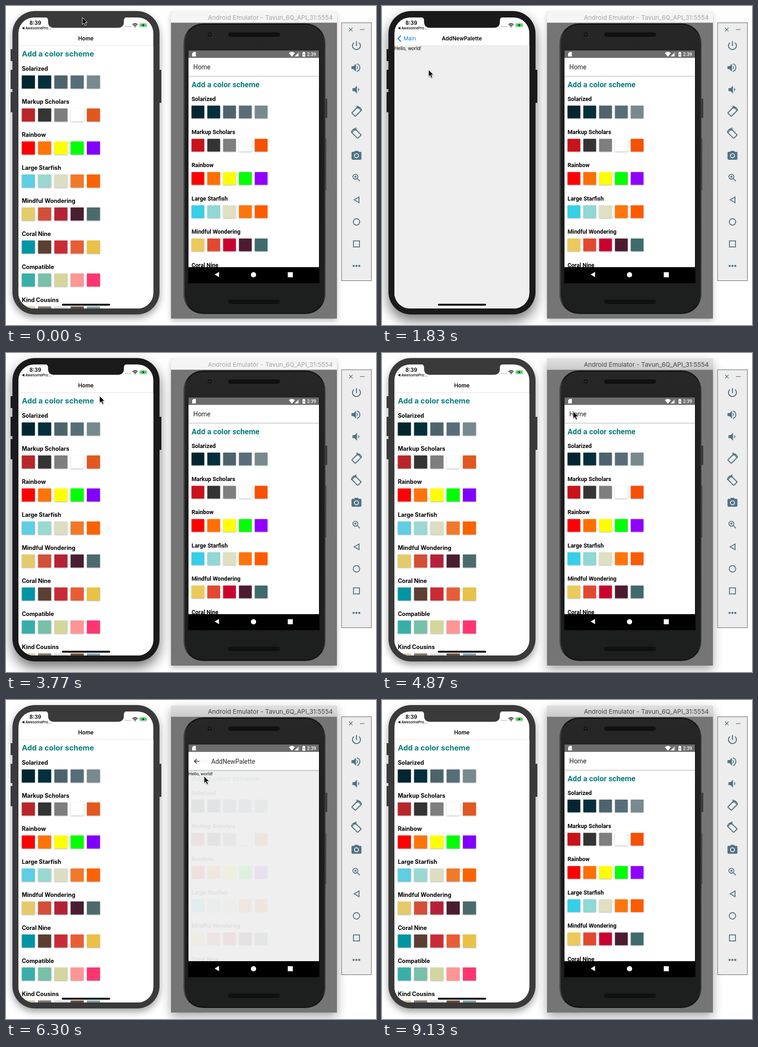
Recreate the animation shown at these times as an HTML page. Size 805 by 695 pixels, loop 9160 ms.

```html
<!DOCTYPE html>
<html lang="en">
<head>
<meta charset="utf-8">
<title>Color schemes on two phones</title>
<style>
html, body { margin: 0; width: 100%; height: 100%; overflow: hidden; background: #fff; }
svg { display: block; width: 805px; height: 695px; }
.ios { font-family: Inter, sans-serif; }
.droid { font-family: Roboto, sans-serif; }
.bold { font-weight: 700; }
.semi { font-weight: 600; }
.swatch { filter: drop-shadow(0 1px 1px rgba(0, 0, 0, .32)); }
</style>
</head>
<body>
<svg viewBox="0 0 805 695">
  <defs>
    <clipPath id="iosScreen"><rect x="27" y="25" width="293.5" height="634" rx="34"/></clipPath>
    <clipPath id="iosBody"><rect x="27" y="86.5" width="294" height="573"/></clipPath>
    <clipPath id="droidCard"><rect x="397" y="113" width="284" height="456"/></clipPath>
    <linearGradient id="bar" x2="0" y2="1">
      <stop stop-color="#e0e0e0"/><stop offset="1" stop-color="#cbcbcb"/>
    </linearGradient>
    <linearGradient id="rim" x2="1" y2="0">
      <stop stop-color="#4a4a4a"/><stop offset=".04" stop-color="#151515"/>
      <stop offset=".97" stop-color="#151515"/><stop offset="1" stop-color="#3c3c3c"/>
    </linearGradient>
    <linearGradient id="glass" x2="0" y2="1">
      <stop stop-color="#272727"/><stop offset=".5" stop-color="#1c1c1c"/><stop offset="1" stop-color="#1d1f1e"/>
    </linearGradient>
    <pattern id="mesh" width="3" height="3" patternUnits="userSpaceOnUse">
      <rect width="3" height="3" fill="#0b0b0b"/><circle cx="1.5" cy="1.5" r=".7" fill="#2b2b2b"/>
    </pattern>
  </defs>
  <rect width="805" height="695" fill="#fff"/>

  <!-- emulator window -->
  <g id="droidShadow"><path d="M359 681V17q0-5 5-5H715q5 0 5 5V681z" fill="#757575"/></g>
  <path id="titleBar" d="M359 36V17q0-5 5-5H715q5 0 5 5V36z"/>
  <path d="M359 36.5H720" stroke="#b4b4b4" stroke-width=".8"/>
  <text id="titleText" class="ios" x="711" y="29.6" font-size="13.6" text-anchor="end">Android Emulator - Tavun_6Q_API_31:5554</text>
  <rect x="695" y="202" width="4" height="42" rx="1" fill="#3c3c3c"/>
  <rect x="695" y="289" width="2" height="112" fill="#4a4a4a"/>
  <rect x="386" y="38" width="309" height="633" rx="43" fill="url(#rim)"/>
  <rect x="389" y="41" width="303.5" height="627" rx="40" fill="url(#glass)"/>
  <circle cx="443" cy="62" r="4.5" fill="#111"/><circle cx="443" cy="62" r="2" fill="#30343a"/>
  <rect x="483" y="57.5" width="113" height="9.5" rx="4.7" fill="url(#mesh)"/>
  <rect x="483" y="639.5" width="113" height="9.5" rx="4.7" fill="url(#mesh)"/>
  <rect x="396.5" y="97" width="285.5" height="507" fill="#000"/>
  <rect x="397" y="97" width="284" height="16" fill="#6d6d6d"/>
  <g fill="#fff">
    <path d="M405 103l3-3h5v10h-8z"/>
    <path d="M615.500 102.500q6.500-5 13 0l-6.500 8z"/>
    <path d="M638 100v10h-10z" fill-opacity=".45"/><path d="M635 103v7h-7z"/>
    <path d="M645 101h1.500v-1h3v1h1.500v9.500h-6z"/>
    <text class="droid" x="655" y="108.700" font-size="10" font-weight="500">2:39</text>
    <path d="M454 585l9.500-5.800v11.600z"/><circle cx="538.500" cy="585.500" r="5.700"/><rect x="613" y="580" width="11" height="11"/>
  </g>
  <path d="M648.600 102l-2 4h1.500l-.5 3 2-4h-1.500z" fill="#6d6d6d"/>
  <g class="droid" clip-path="url(#droidCard)">
    <rect x="397" y="113" width="284" height="456" fill="#fff"/>
    <g id="droidList"></g>
    <g class="header"><rect x="397" y="113" width="284" height="39" fill="#fff" class="swatch"/></g>
    <text x="407.500" y="138" font-size="13.850" fill="#1d1d1d">Home</text>
    <g id="droidNew">
      <rect x="397" y="113" width="284" height="500" fill="#efefef"/>
      <rect x="397" y="113" width="284" height="39" fill="#fff" class="swatch"/>
      <circle id="ripple" cx="415" cy="132.500" r="15" fill="#d9d9d9"/>
      <path d="M420.500 132.800H410M415 127.700l-5.200 5.100 5.200 5.100" fill="none" stroke="#1d1d1d" stroke-width="1.400"/>
      <text x="446.500" y="138" font-size="13.850" fill="#1d1d1d">AddNewPalette</text>
      <text x="397" y="163" font-size="9.700">Hello, world!</text>
    </g>
  </g>

  <!-- emulator tool panel -->
  <rect x="730" y="36.500" width="65" height="562" fill="#ededed" stroke="#5b5b5b"/>
  <g id="tools" fill="#507385" stroke="none"></g>

  <!-- iPhone -->
  <g id="iosShadow" class="frame"><rect x="14" y="11" width="320" height="661" rx="49"/></g>
  <g class="frame">
    <path d="M10 94h5v26h-5zM10 139h5v42h-5zM10 187.500h5v44h-5zM333 139h5v72h-5z"/>
  </g>
  <g class="ios" clip-path="url(#iosScreen)">
    <rect x="27" y="25" width="294" height="635" fill="#fff"/>
    <g clip-path="url(#iosBody)">
      <g id="iosList"></g>
      <g id="iosNew">
        <rect x="27" y="86" width="294" height="574" fill="#efefef" style="filter:drop-shadow(0 0 3px rgba(0,0,0,.3))"/>
        <text x="27" y="96" font-size="9.900">Hello, world!</text>
      </g>
    </g>
    <path d="M27 86.500H321" stroke="#d9d9d9" stroke-width=".8"/>
    <text id="iosHome" class="semi" x="173.700" y="75.200" font-size="11.700" text-anchor="middle">Home</text>
    <text id="iosTitle" class="semi" x="173.700" y="75.200" font-size="11.700" text-anchor="middle">AddNewPalette</text>
    <g id="iosBack">
      <path d="M41 64.500l-6.200 6.500 6.200 6.500" fill="none" stroke="#1580d8" stroke-width="2"/>
      <text x="47" y="75.200" font-size="11.700" fill="#1580d8">Main</text>
    </g>
    <text class="semi" x="51" y="40.700" font-size="11.500">8:39</text>
    <path d="M34.500 48.300l5.500-3v6z"/>
    <text x="42" y="51.200" font-size="7.900" font-weight="500">AwesomePro...</text>
    <g fill="#b8b8b8"><circle cx="260" cy="44.500" r="1.200"/><circle cx="263.700" cy="44.500" r="1.200"/><circle cx="267.400" cy="44.500" r="1.200"/><circle cx="271" cy="44.500" r="1.200"/></g>
    <g fill="none" stroke="#000" stroke-width="1.700"><path d="M275.500 40.700q5.300-4.600 10.600 0M277.600 43q3.200-2.700 6.400 0"/></g>
    <path d="M279 44.800q1.800-1.300 3.600 0l-1.800 2z"/>
    <rect x="290.500" y="37.500" width="16" height="8.500" rx="2" fill="#fff" stroke="#999" stroke-width=".8"/>
    <rect x="291.700" y="38.700" width="13.600" height="6.100" rx="1" fill="#37d84d"/>
    <path d="M307.600 40.300q1.500 1.500 0 3z" fill="#999"/>
    <path d="M299.500 38l-3.500 4.300h2.300l-.8 3.200 3.500-4.300h-2.300z"/>
    <rect x="121.500" y="648.800" width="105" height="4" rx="2"/>
  </g>
  <path class="frame" d="M83 24q8.500 0 8.500 8v2q0 13.500 13.500 13.500H243q13.500 0 13.500-13.500v-2q0-8 8.500-8z"/>

  <path id="cursor" d="M0 0V15.300L3.500 12 6.100 17.800 8.700 16.600 6.200 11H11z" fill="#000" stroke="#fff" stroke-width="1" style="filter:drop-shadow(0 1px 1px rgba(0,0,0,.35))"/>
</svg>
<script>
const LOOP = 9160;
const $ = id => document.getElementById(id);

const schemes = [
  ['Solarized', '02252f 042f3c 4d646c 576e79 778a8d'],
  ['Markup Scholars', 'b92629 343434 7e7e7e ffffff e2571f', 'c9121a 343434 7e7e7e ffffff f75002'],
  ['Rainbow', 'ff0000 ff7409 ffff00 00ff00 8000ff', 'ff0000 ff6f00 ffff00 00ff00 9000ff'],
  ['Large Starfish', '5fcde4 9ad8d2 dddcc4 f2792a fb6200', '35cfe8 8fd8d3 dfe0c2 ff740a ff5a00'],
  ['Mindful Wondering', 'e5ca6b d34f38 b52238 4a1e30 4c6a6c', 'ecc95b e2482f c9022f 4d1b2f 3f6b6c'],
  ['Coral Nine', '0095a5 5c3e32 c92c36 e85d36 e9c147'],
  ['Compatible', '39aea9 78c0a8 d5d69d ff9594 ff3571'],
  ['Kind Cousins', 'dcc6aa 86776a dedede 6d4e38 829fae']
];

function listMarkup(o) {
  const text = (s, y, size, fill) =>
    `<text class="bold" x="${o.x}" y="${y}" font-size="${size}" fill="${fill}">${s}</text>`;
  const rows = schemes.map(([name, ios, droid], r) => {
    const y = r * o.rowStep;
    const colors = (o.droid && droid || ios).split(' ');
    return text(name, o.titleY + y, o.size, '#000') + colors.map((c, i) =>
      `<rect class="swatch" x="${o.x + i * o.step}" y="${o.boxY + y}" width="${o.box}" height="${o.box}" fill="#${c}"/>`).join('');
  });
  return text('Add a color scheme', o.headY, o.headSize, '#087d7c') + rows.join('');
}

$('iosList').innerHTML = '<rect x="27" y="86" width="294" height="574" fill="#fff"/>' + listMarkup(
  { x: 34.4, headY: 110, headSize: 16.3, titleY: 141.3, size: 12.45, boxY: 151.3, box: 28.5, step: 35.4, rowStep: 71.9 });
$('droidList').innerHTML = listMarkup(
  { droid: true, x: 403.7, headY: 176.6, headSize: 16.6, titleY: 206.6, size: 12.45, boxY: 217, box: 27.7, step: 34.4, rowStep: 72.4 });

// Tool icons on a 24-unit grid, one every 48px
const stroke = 'fill="none" stroke="#507385" stroke-width="2"';
const rotate = '<g transform="rotate(45 12 12)"><rect x="7" y="3.500" width="10" height="17" rx="1"' + stroke +
  '/></g><path d="M13 1.500q8 .500 9.500 8.500M13 .500l4 3.500-4 1z" fill="none" stroke="#507385" stroke-width="1.600"/>';
const icons = [
  '<path d="M13 3h-2v10h2V3zm4.830 2.170l-1.420 1.420C17.990 7.860 19 9.810 19 12c0 3.870-3.130 7-7 7s-7-3.130-7-7c0-2.190 1.010-4.140 2.580-5.420L6.170 5.170C4.230 6.820 3 9.260 3 12c0 4.970 4.030 9 9 9s9-4.030 9-9c0-2.740-1.230-5.180-3.170-6.830z"/>',
  `<path d="M2 9v6h4l5 5V4L6 9z"/><path d="M13 8q4 4 0 8z"/><path d="M13 4.300a8 8 0 0 1 0 15.400" ${stroke}/>`,
  '<path d="M4 9v6h4l5 5V4L8 9z"/><path d="M15.500 8q4.500 4 0 8z"/>',
  rotate,
  `<g transform="matrix(-1 0 0 1 24 0)">${rotate}</g>`,
  '<path fill-rule="evenodd" d="M9 2L7.200 4H4q-2 0-2 2v12q0 2 2 2h16q2 0 2-2V6q0-2-2-2h-3.200L15 2zM12 7a5 5 0 1 1 0 10 5 5 0 1 1 0-10z"/><circle cx="12" cy="12" r="3.200"/>',
  `<circle cx="9.500" cy="9.500" r="5.700" ${stroke}/><path d="M14 14l6 6M9.500 7v5M7 9.500h5" ${stroke}/>`,
  `<path d="M18 5.500v13L6.500 12z" ${stroke}/>`,
  `<circle cx="12" cy="12" r="7.500" ${stroke}/>`,
  `<rect x="5" y="5" width="14" height="14" ${stroke}/>`,
  '<circle cx="5.500" cy="12" r="2.400"/><circle cx="12" cy="12" r="2.400"/><circle cx="18.500" cy="12" r="2.400"/>'
];
$('tools').innerHTML =
  '<path d="M746.500 47.500l7.500 7.500M754 47.500l-7.500 7.500M770 51.300h10" stroke="#507385" stroke-width="1.300"/>' +
  icons.map((icon, i) => {
    const s = i < 6 ? 1.08 : .94;
    return `<g transform="translate(${762.5 - 12 * s} ${86.3 + 48 * i - 12 * s}) scale(${s})">${icon}</g>`;
  }).join('');

// Cursor stops: time, x, y
const path = [
  [0, 166, 25], [300, 166, 25], [850, 102.5, 154.5], [1050, 102.5, 154.5],
  [1270, 98, 106], [1520, 98, 106], [2000, 102.5, 152], [2700, 102.5, 152],
  [3050, 48, 69], [3300, 48, 69], [4350, 416, 127.5], [4950, 416, 127.5],
  [5600, 431, 166], [6700, 431, 166], [7350, 416, 129.5], [7850, 416, 129.5], [8250, 806, 215]
];

const clamp = v => Math.max(0, Math.min(1, v));
const span = (t, start, length) => clamp((t - start) / length);
const easeOut = k => 1 - (1 - k) ** 5;
const easeIn = k => k ** 4;
const move = (id, x, y) => $(id).setAttribute('transform', `translate(${x} ${y})`);

function cursorAt(t) {
  const i = path.findIndex(p => p[0] > t);
  if (i < 0) return null;
  const [t0, x0, y0] = path[i - 1], [t1, x1, y1] = path[i];
  const k = (t - t0) / (t1 - t0), e = k * k * (3 - 2 * k);
  return [x0 + (x1 - x0) * e, y0 + (y1 - y0) * e];
}

function focusWindows(t) {
  const ios = t >= 880 && t < 4740, droid = t >= 4740;
  const shadow = on => on ? 'drop-shadow(0 13px 14px rgba(0,0,0,.55))' : 'drop-shadow(0 7px 8px rgba(0,0,0,.38))';
  $('iosShadow').style.filter = shadow(ios);
  $('droidShadow').style.filter = droid ? 'drop-shadow(0 9px 11px rgba(0,0,0,.35))' : 'drop-shadow(0 5px 6px rgba(0,0,0,.25))';
  document.querySelectorAll('.frame').forEach(f => f.setAttribute('fill', ios ? '#1a1a1a' : '#3a3a3a'));
  $('titleBar').setAttribute('fill', droid ? 'url(#bar)' : '#f5f5f5');
  $('titleText').setAttribute('fill', droid ? '#444' : '#a5a5a5');
}

function slideIos(t) {
  const p = easeOut(span(t, 1400, 500)) - easeOut(span(t, 3200, 500));
  move('iosList', -88 * p, 0);
  move('iosNew', 300 * (1 - p), 0);
  move('iosHome', -110 * p, 0);
  move('iosTitle', 110 * (1 - p), 0);
  $('iosHome').setAttribute('opacity', clamp(1 - 1.4 * p));
  $('iosTitle').setAttribute('opacity', clamp(1.4 * p - .4));
  $('iosBack').setAttribute('opacity', clamp(1.4 * p - .4));
}

function fadeDroid(t) {
  const p = easeOut(span(t, 6110, 350)) - easeIn(span(t, 7790, 230));
  const opacity = p < .5 ? p / 2 : p < .9 ? .25 + (p - .5) * 1.125 : .7 + (p - .9) * 3;
  $('droidNew').setAttribute('opacity', clamp(opacity));
  move('droidNew', 0, 35 * (1 - p));
  $('ripple').setAttribute('opacity', span(t, 7560, 100));
}

let active = null;
function draw(t) {
  const state = (t >= 880) + (t >= 4740);
  if (state !== active) { active = state; focusWindows(t); }
  slideIos(t);
  fadeDroid(t);
  const tip = cursorAt(t);
  $('cursor').setAttribute('visibility', tip ? 'visible' : 'hidden');
  if (tip) move('cursor', ...tip);
}

const start = performance.now();
function tick() {
  draw((performance.now() - start) % LOOP);
  requestAnimationFrame(tick);
}
tick();
</script>
</body>
</html>
```
